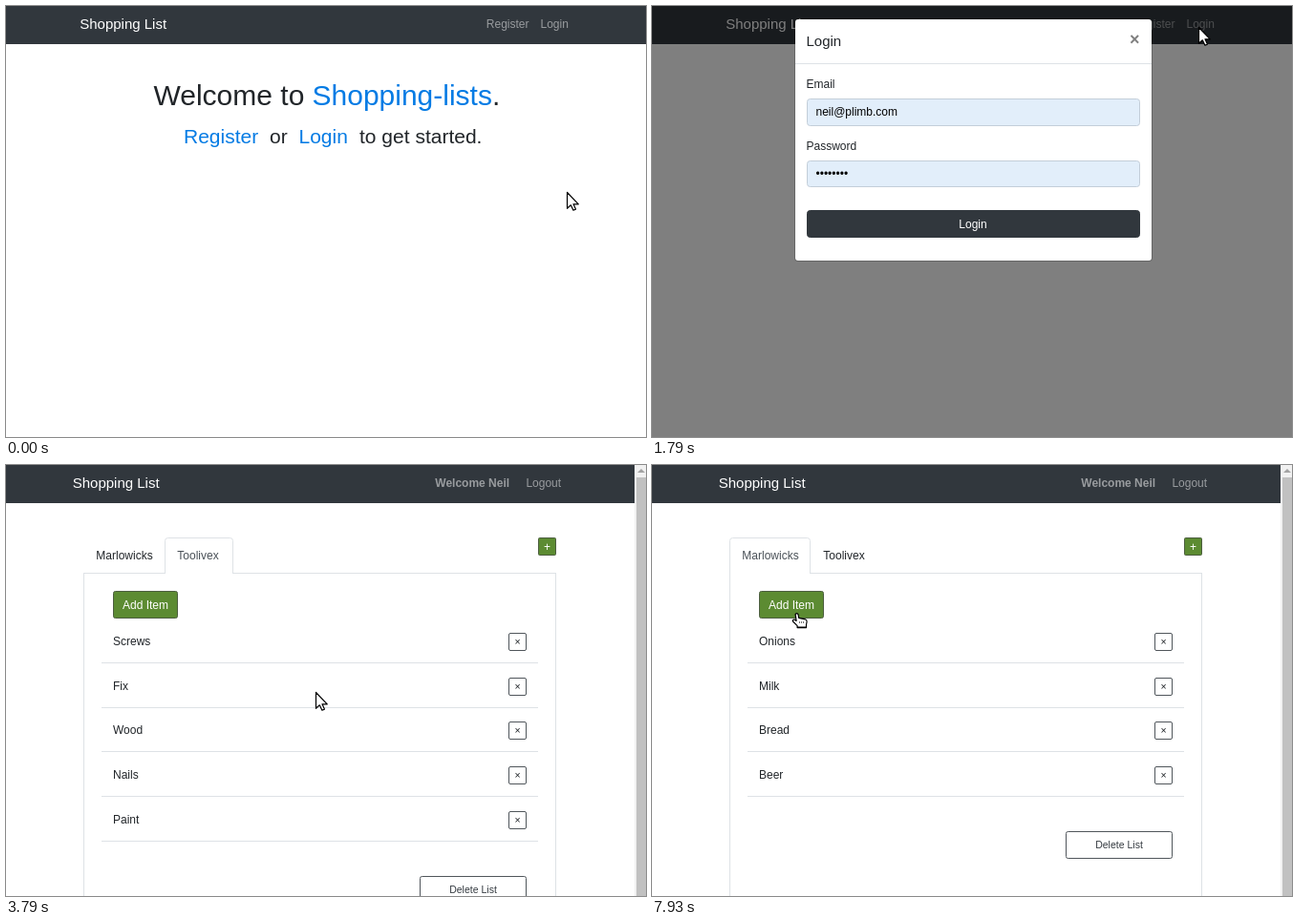
An HTML page with a canvas that plays this animation: 670x452 px, repeating every 8000 ms.

```html
<!DOCTYPE html>
<html lang="en">
<head>
<meta charset="utf-8">
<title>Shopping List</title>
<style>
html, body { margin: 0; width: 670px; height: 452px; overflow: hidden; background: #fff; }
canvas { display: block; }
</style>
</head>
<body>
<canvas id="stage" width="670" height="452"></canvas>
<script>
const ctx = document.getElementById('stage').getContext('2d');
const LOOP = 8000, START = 500, TICK = 1000 / 7;
const FONT = '"Liberation Sans", Arial, sans-serif';
const INK = '#212529', DARK = '#31373d', LINK = '#047be4', GREEN = '#5c8b32', RULE = '#dee2e6';

const LISTS = [
  { name: 'Marlowicks', x: 81.5, width: 84, items: ['Onions', 'Milk', 'Bread', 'Beer'] },
  { name: 'Toolivex', x: 166.5, width: 71, items: ['Screws', 'Fix', 'Wood', 'Nails', 'Paint'] }
];

// Pointer waypoints: tick, x, y
const PATH = [
  [-4, 587, 195], [-1, 587, 195], [0, 593, 168], [1, 593, 168], [4, 572, 22], [11, 572, 22],
  [16, 322, 230], [17, 322, 230], [18, 325, 238], [22, 325, 238], [23, 324, 238], [24, 324, 238],
  [27, 247, 145], [28, 247, 145], [30, 215, 73], [32, 215, 73], [33, 213, 88], [39, 213, 88],
  [41, 125, 92], [47, 125, 92], [49, 183, 170], [52, 152, 155], [60, 152, 155]
];
const HAND_SPANS = [[4, 6], [16, 23], [30, 48], [51, 60]];

const ARROW = new Path2D('M.5 .5V17.3L4.3 13.8L6.9 19.2L9.4 18.1L7 12.8H12.3Z');
const HAND = new Path2D('M3.6 1.6Q5 -.4 6.5 1.6L7.2 5.4L14 6.8Q15.8 7.4 15.6 9.5L15 12.5V15.6H5.6V13.6L1 9Q.2 6.8 3 7.2L4.6 8.4Z');

const clamp = v => Math.max(0, Math.min(1, v));
const within = (v, [from, to]) => v >= from && v < to;

function text(str, x, y, size = 12, color = INK, align = 'left', weight = '') {
  ctx.font = `${weight} ${size}px ${FONT}`;
  ctx.fillStyle = color;
  ctx.textAlign = align;
  ctx.fillText(str, x, y);
}

function box(x, y, w, h, r, fill, stroke) {
  const inset = stroke ? .5 : 0;
  ctx.beginPath();
  ctx.roundRect(x + inset, y + inset, w - 2 * inset, h - 2 * inset, r);
  ctx.fillStyle = fill;
  ctx.fill();
  if (!stroke) return;
  ctx.strokeStyle = stroke;
  ctx.lineWidth = 1;
  ctx.stroke();
}

function rect(x, y, w, h, color) {
  ctx.fillStyle = color;
  ctx.fillRect(x, y, w, h);
}

function drawWelcome(loginHover) {
  const muted = '#999c9f';
  rect(0, 0, 670, 40, DARK);
  text('Shopping List', 77.2, 24, 15, '#fff');
  text('Register', 502.8, 23, 12, muted);
  text('Login', 559.5, 23, 12, loginHover ? '#ccced0' : muted);
  text('Welcome to ', 154.5, 104, 30);
  text('Shopping-lists', 320.5, 104, 30, LINK);
  text('.', 509, 104, 30);
  text('Register', 186, 144, 21, LINK);
  text('or', 276, 144, 21);
  text('Login', 306.5, 144, 21, LINK);
  text('to get started.', 370, 144, 21);
}

function drawModal(ms, hover, focus) {
  const shift = Math.round(-37.5 * (1 - clamp(ms / 300)) ** 2);
  ctx.save();
  ctx.globalAlpha = clamp(ms / 150);
  ctx.translate(0, shift);
  box(149, 19, 375, 255, 4, 'rgba(0,0,0,.2)');
  box(150, 20, 373, 253, 3, '#fff');
  text('Login', 161.5, 48, 15);
  text('×', 505.3, 46.5, 18, '#7f7f7f', 'center', 'bold');
  rect(150, 66, 373, 1, RULE);
  text('Email', 161.5, 92);
  box(162, 103, 349, 29, 3, '#e2eefa', '#c3ced9');
  text('neil@plimb.com', 171.5, 121, 12, '#000');
  text('Password', 161.5, 157);
  box(162, 168, 349, 28, 3, '#e2eefa', '#c3ced9');
  text('••••••••', 171.5, 186, 12, '#000');
  if (focus) box(159.75, 217.75, 353.5, 33.5, 5, 'rgba(82,88,93,.5)');
  box(162, 220, 349, 29, 3, hover ? '#22272b' : DARK, hover ? '#1d2124' : DARK);
  text('Login', 336, 239, 12, '#fff', 'center');
  ctx.restore();
}

function drawTab(list, active, hover) {
  if (active || hover) {
    ctx.beginPath();
    ctx.moveTo(list.x, active ? 114 : 113);
    ctx.lineTo(list.x, 79.5);
    ctx.arcTo(list.x, 76.5, list.x + 3, 76.5, 3);
    ctx.arcTo(list.x + list.width, 76.5, list.x + list.width, 79.5, 3);
    ctx.lineTo(list.x + list.width, active ? 114 : 113);
    ctx.fillStyle = '#fff';
    ctx.fill();
    ctx.strokeStyle = active ? RULE : '#e9ecef';
    ctx.lineWidth = 1;
    ctx.stroke();
  }
  text(list.name, list.x + 12.8, 99, 12, active ? '#495057' : INK);
}

function drawScrollbar() {
  rect(658, 0, 12, 452, '#f1f1f1');
  rect(660, 13, 10, 439, '#c1c1c1');
  ctx.beginPath();
  ctx.moveTo(661, 8);
  ctx.lineTo(665, 4);
  ctx.lineTo(669, 8);
  ctx.fillStyle = '#a3a3a3';
  ctx.fill();
}

function drawLists(active, hovered) {
  rect(0, 0, 670, 40, DARK);
  text('Shopping List', 69.7, 24, 15, '#fff');
  text('Welcome Neil', 449.3, 23, 12, '#999c9f', 'left', 'bold');
  text('Logout', 544.4, 23, 12, '#999c9f');

  ctx.strokeStyle = RULE;
  ctx.lineWidth = 1;
  ctx.strokeRect(81.5, 113.5, 494, 400);
  LISTS.forEach((list, i) => drawTab(list, i === active, i === hovered));

  box(557, 76, 19, 19, 1, GREEN, '#4c5e3f');
  text('+', 566.5, 90, 12, '#fff', 'center');
  box(112, 132, 68, 29, 2, GREEN, '#4c5e3f');
  text('Add Item', 146, 151, 12, '#fff', 'center');

  const items = LISTS[active].items;
  items.forEach((item, i) => {
    const dy = Math.round(i * 46.75 - .1);
    text(item, 112, 189 + dy);
    box(526, 176 + dy, 19, 19, 1.5, '#fff', '#50565b');
    text('×', 535.5, 189 + dy, 10.5, INK, 'center');
    rect(100, 207 + dy, 457, 1, RULE);
  });
  const top = Math.round(197 + items.length * 46.75);
  box(433, top, 112, 29, 2, '#fff', '#50565b');
  text('Delete List', 489, top + 18, 10.5, '#343a40', 'center');
  drawScrollbar();
}

function drawPointer(tick) {
  const next = PATH.findIndex(p => p[0] > tick);
  const [a, b] = [PATH[next - 1], PATH[next]];
  const k = (tick - a[0]) / (b[0] - a[0]);
  const hand = HAND_SPANS.some(span => within(tick, span));
  const x = Math.round(a[1] + (b[1] - a[1]) * k);
  const y = Math.round(a[2] + (b[2] - a[2]) * k);
  ctx.save();
  ctx.translate(hand ? x - 5.5 : x, y);
  ctx.lineJoin = 'round';
  ctx.fillStyle = '#fff';
  ctx.strokeStyle = '#000';
  ctx.lineWidth = 1.2;
  ctx.fill(hand ? HAND : ARROW);
  ctx.stroke(hand ? HAND : ARROW);
  if (hand) {
    for (const dx of [7.5, 9.5, 11.5]) rect(dx, 9, 1, 2, '#777');
    rect(5.5, 14.5, 9.5, 1.5, '#000');
  }
  ctx.restore();
}

function draw(time) {
  // The screen is refreshed seven times a second.
  const tick = Math.floor((time - START + 5) / TICK);
  const now = START + tick * TICK;
  rect(0, 0, 670, 452, '#fff');
  if (tick < 23) {
    drawWelcome(within(tick, [4, 7]));
    const shade = .5 * clamp((now - 1270) / 150);
    if (shade) rect(0, 0, 670, 452, `rgba(0,0,0,${shade})`);
    if (now > 1610) drawModal(now - 1610, tick >= 16, tick >= 19);
  } else {
    const first = within(tick, [25, 34]) || tick >= 45;
    const hovered = within(tick, [30, 41]) ? 1 : within(tick, [41, 48]) ? 0 : -1;
    drawLists(first ? 0 : 1, hovered);
  }
  drawPointer(tick);
}

function frame(now) {
  draw(now % LOOP);
  requestAnimationFrame(frame);
}
draw(0);
requestAnimationFrame(frame);
</script>
</body>
</html>
```
